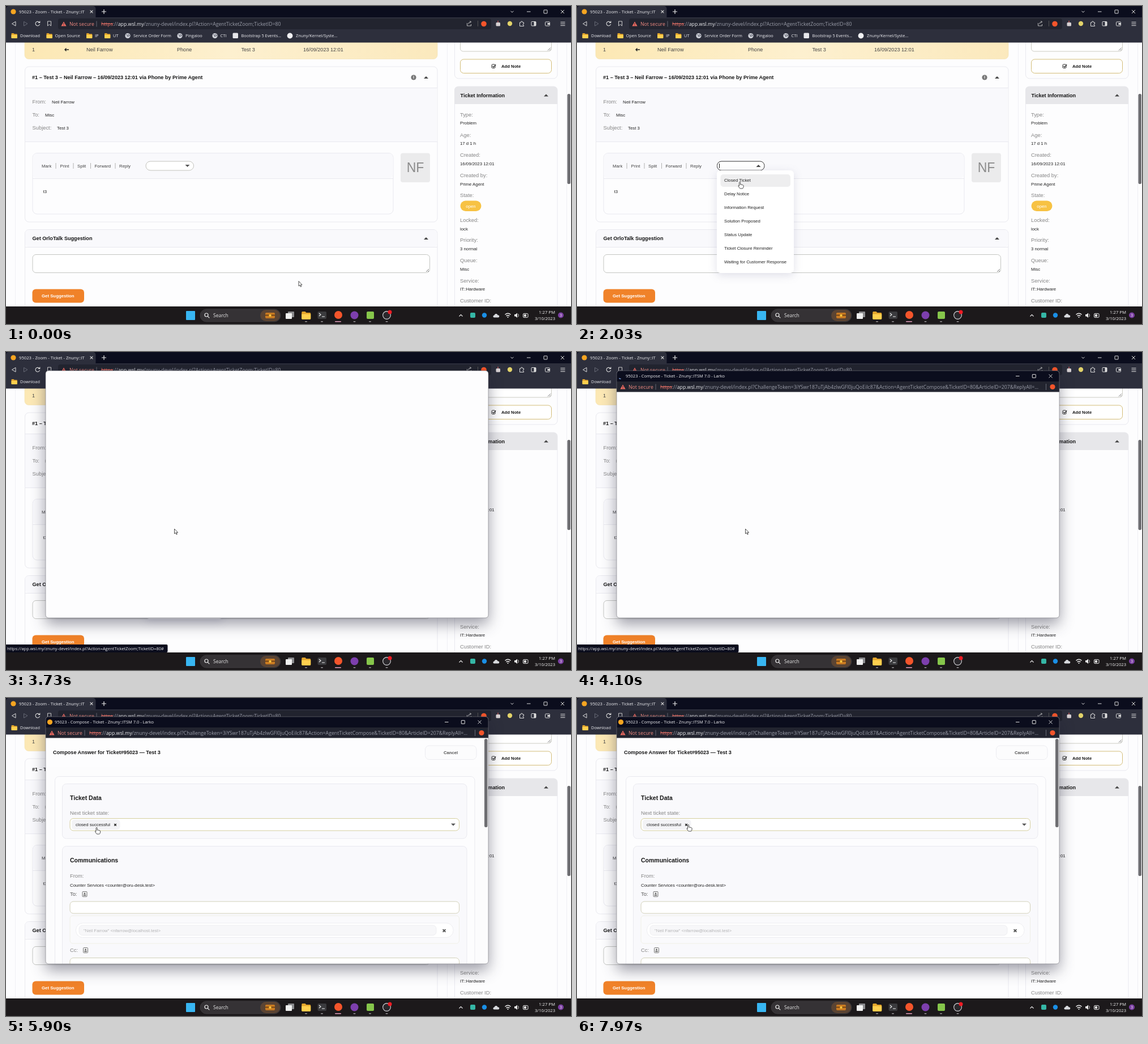
These frames come from a looping animation (998 by 561 pixels, 8 s). An HTML page:

```html
<!DOCTYPE html>
<html lang="en">
<head>
<meta charset="utf-8">
<title>Ticket reply</title>
<style>
html, body { margin: 0; width: 100%; height: 100%; overflow: hidden; background: #fff; }
svg { display: block; width: 100%; height: 100%; font-family: "Liberation Sans", Arial, sans-serif; }
.ui { font-family: "Open Sans", "Noto Sans", sans-serif; }
.pop-shadow { filter: drop-shadow(0 11px 13px rgba(25, 25, 45, .42)); }
.menu-shadow { filter: drop-shadow(0 4px 8px rgba(60, 60, 110, .16)); }
</style>
</head>
<body>
<svg id="stage" viewBox="0 0 998 561" preserveAspectRatio="none"></svg>
<script>
const LOOP = 8000;
const INK = '#222', MUTED = '#858585', EDGE = '#e9e9ef', TINT = '#f9f9fc', ORANGE = '#f08229', BRAND = '#f4552b';
const USER = 'Neil Farrow', AGENT = 'Prime Agent';

const esc = s => s.replace(/&/g, '&amp;').replace(/</g, '&lt;');
// y is the vertical middle of the line
const text = (x, y, s, size = 7.8, fill = INK, extra = '') =>
  `<text x="${x}" y="${y + size * .35}" font-size="${size}" fill="${fill}" ${extra}>${esc(s)}</text>`;
const bold = (x, y, s, size = 9.1, fill = '#151515', extra = '') => text(x, y, s, size, fill, 'font-weight="700" ' + extra);
const label = (x, y, s) => text(x, y, s, 9.35, MUTED);
const box = (x, y, x2, y2, r = 0, fill = '#fff', stroke = 'none', extra = '') =>
  `<rect x="${x}" y="${y}" width="${x2 - x}" height="${y2 - y}" rx="${r}" fill="${fill}" stroke="${stroke}" ${extra}/>`;
const dot = (x, y, r, fill) => `<circle cx="${x}" cy="${y}" r="${r}" fill="${fill}"/>`;
const line = (d, stroke, w = 1, extra = '') => `<path d="${d}" fill="none" stroke="${stroke}" stroke-width="${w}" ${extra}/>`;
const shape = (d, fill) => `<path d="${d}" fill="${fill}"/>`;
const group = (id, body, extra = '') => `<g id="${id}" ${extra}>${body}</g>`;
const up = (x, y, c = '#444') => shape(`M${x - 4} ${y + 2}h8l-4-4z`, c);
const down = (x, y, c = '#555') => shape(`M${x - 4} ${y - 2}h8l-4 4z`, c);
const cross = (x, y, r, c, w = 1) => line(`M${x - r} ${y - r}l${2 * r} ${2 * r}m0 ${-2 * r}l${-2 * r} ${2 * r}`, c, w);
const chevron = (x, y, c = '#222', w = 1.3) => line(`M${x - 2.5} ${y - 1.2}l2.5 2.5 2.5-2.5`, c, w);
const folder = (x, y, k = 1) => `<g transform="translate(${x} ${y}) scale(${k})">` +
  shape('M-5-3.5q0-1 1-1h3l1.3 1.3h4q1 0 1 1v5.5q0 1-1 1h-8.3q-1 0-1-1z', '#e3a52c') + shape('M-5-1.6h10.3v5q0 1-1 1h-8.3q-1 0-1-1z', '#ffd04f') + '</g>';
const globe = (x, y) => dot(x, y, 4.6, '#d5d7de') + line(`M${x - 3} ${y - 2}l3 1-1 3M${x + 1} ${y - 3}l2 2.5-2 2`, '#5b5e6c', 1.2);
const warning = (x, y) => shape(`M${x} ${y - 4}l4.6 8h-9.2z`, '#ee6c62') + line(`M${x} ${y - 1.4}v2.6m0 .8v1`, '#2a2030', 1);
const grip = (x, y) => line(`M${x} ${y}l5-5m-2 5l2-2`, '#555', .8);
const controls = (x, y, gap) => line(`M${x - 3} ${y}h6.5`, '#ddd') +
  box(x + gap - 3, y - 3, x + gap + 3, y + 3, .5, 'none', '#ddd') + cross(x + 2 * gap, y, 3, '#ddd');
const address = (x, y, rest) => warning(x - 66, y) + text(x - 56, y, 'Not secure', 8.7, '#f28b82') +
  line(`M${x - 8} ${y - 5}v10`, '#666975') +
  `<text x="${x}" y="${y + 3}" font-size="8.73" fill="#9b9eaa"><tspan fill="#e57067" text-decoration="line-through">https</tspan>://` +
  `<tspan fill="#f1f1f4">app.wsl.my</tspan>${esc(rest)}</text>`;

function page() {
  const bar = x => line(`M${x} 277v10`, '#aaa', .9);
  let s = box(0, 64, 998, 530, 0, '#fdfdfe') + line('M16.5 64V530M779.5 64V530M990.5 64V530', '#f0f0f4');
  s += box(33, 50, 762, 93.5, 7, 'url(#gold)', '#f4e3b4', 'stroke-width=".7"');
  s += text(46, 77, '1', 9.1, '#444') + line('M111 77h-7m2.5-2.5l-2.5 2.5 2.5 2.5', '#222', 1.4);
  [[142, USER], [302, 'Phone'], [415.5, 'Test 3'], [525, '16/09/2023 12:01']].forEach(([x, v]) => s += text(x, 77, v, 9.1, '#444'));

  s += box(33.5, 107, 762, 381, 7, '#fdfdfe', EDGE) + box(34, 145, 761.5, 239, 0, TINT) +
    line('M34 144.5H762M34 239.5H762', EDGE) + bold(46, 126, `#1 – Test 3 – ${USER} – 16/09/2023 12:01 via Phone by ${AGENT}`) +
    dot(720, 126, 4.6, '#777') + text(720, 126, 'i', 7, '#fff', 'text-anchor="middle" font-weight="700"') + up(742, 126);
  [['From:', 81, USER], ['To:', 69, 'Misc'], ['Subject:', 90, 'Test 3']].forEach(([k, x, v], i) =>
    s += label(46.5, 169 + 22.8 * i, k) + text(x, 169.4 + 22.8 * i, v));
  s += box(47, 259.5, 684, 367, 8, '#fdfdfe', EDGE) + box(47.5, 260, 683.5, 304, 7, TINT) + line('M47 304.5H684', EDGE);
  [[63, 'Mark'], [95.5, 'Print'], [126, 'Split'], [156.5, 'Forward'], [200, 'Reply']].forEach(([x, v]) => s += text(x, 282, v, 7.8, '#444'));
  s += [88, 119, 149.5, 193].map(bar).join('') + text(65.5, 327, 't3');
  s += box(697, 259.5, 749, 311, 4, '#ebebec') + text(723, 285, 'NF', 23, '#8b8b8b', 'text-anchor="middle"');
  s += group('replyShut', box(247, 274, 331.5, 290, 8, '#fff', '#c3c3bd') + down(320.5, 282));

  s += box(33.5, 394.5, 762, 550, 7, '#fdfdfe', EDGE) + box(34, 395, 761.5, 425, 6, TINT) + line('M34 425.5H762', EDGE) +
    bold(46.5, 410, 'Get OrloTalk Suggestion') + up(742, 410) +
    box(47, 438.5, 748.5, 470.5, 6, '#fff', '#c4c6c2') + grip(742, 469) +
    box(46.5, 499.5, 138, 523.5, 6, ORANGE) + bold(63, 511.5, 'Get Suggestion', 7.8, '#fff');

  s += box(792.5, 40, 974, 128, 7, '#fdfdfe', EDGE) + box(802.5, 40, 963.5, 80, 5, '#fff', '#ccccc4') + grip(957, 78.5) +
    box(802.5, 94, 963.5, 118.5, 6, '#fff', '#d3bd78') + bold(875, 106.3, 'Add Note', 7.7) +
    box(858, 103, 864, 109.5, 1.4, 'none', '#222') + line('M859.5 106l1.7 1.8 4-4.5', '#222', 1.2);
  s += box(792.5, 142, 974, 560, 7, '#fdfdfe', EDGE) + shape('M792 173V149q0-7 7-7H967q7 0 7 7V173z', '#e7e7ea') +
    bold(802.5, 157.5, 'Ticket Information') + up(954, 157.5);
  [[191.5, 'Type:', 'Problem'], [227.3, 'Age:', '17 d 1 h'], [263, 'Created:', '16/09/2023 12:01'], [298.7, 'Created by:', AGENT],
   [334, 'State:', ''], [377.7, 'Locked:', 'lock'], [413, 'Priority:', '3 normal'], [449, 'Queue:', 'Misc'],
   [484.3, 'Service:', 'IT::Hardware'], [520, 'Customer ID:', '']].forEach(([y, k, v]) =>
    s += label(802, y, k) + text(802, y + 15.2, v));
  s += box(802.5, 343.5, 839.5, 362, 9.2, '#f7c243') + text(821, 353, 'open', 7.8, '#fff', 'text-anchor="middle"');
  return s + box(991.5, 155, 997, 314, 2.5, '#6e6e72');
}

function replyMenu() {
  const names = ['Closed Ticket', 'Delay Notice', 'Information Request', 'Solution Proposed', 'Status Update',
    'Ticket Closure Reminder', 'Waiting for Customer Response'];
  return box(247.5, 274, 331, 290, 7.5, '#fff', '#333') + line('M251.5 278v8', '#222', 1) + up(320.5, 282) +
    box(247, 290, 383, 471, 6, '#fff', 'none', 'class="menu-shadow"') + box(253.5, 297, 377, 319, 5, '#eeeeef') +
    names.map((n, i) => text(260, 307.7 + 23.9 * i, n)).join('');
}

function chrome() {
  let s = box(0, 0, 998, 21, 0, '#0b0d1d') + box(0, 20, 998, 64.5, 0, '#2d2f3c') + box(0, 0, 158.5, 24, 5, '#2d2f3c') +
    dot(13, 10, 4.6, '#f6a521') + `<g clip-path="url(#tab)">${text(23, 10, '95023 - Zoom - Ticket - Znuny::ITSM', 7.7, '#f0f0f3')}</g>` +
    cross(151, 10, 2.4, '#ddd', 1.1) + line('M169 10h8m-4-4v8', '#eee', 1.2) + chevron(894, 10, '#ddd', 1) + controls(923, 10, 30);
  s += line('M17 27.5l-6.5 3.8 6.5 3.8z', '#ddd') + line('M31.500 27.500l6.500 3.800-6.500 3.800z', '#666975') +
    line('M59 29a3.800 3.800 0 1 0 .6 3M59.800 26.500v3h-3', '#ddd', 1.1) + line('M73.500 27h6v8l-3-2.500-3 2.500z', '#ccc') +
    box(92, 22, 857, 41, 4, '#22242f') + address(168, 31.5, '/znuny-devel/index.pl?Action=AgentTicketZoom;TicketID=80');
  s += line('M814.500 30v5h7v-3M817 32q0-4 4.500-4m-2-1.500l2 1.500-2 1.700', '#ccc', .9) + line('M833.500 26v10', '#555') + dot(844, 31.500, 4.800, BRAND);
  s += box(865.5, 29, 873, 35.5, 1.5, '#d6d0d2') + line('M869 26v3', '#d66', 1.2) + dot(890, 31, 4.2, '#e2d36a') +
    line('M907.500 29h2q0-2 1.500-2t1.500 2h2v2.500q-1.500 0-1.500 1.200t1.500 1.300v1.500h-7z', '#ddd') +
    box(928, 27.5, 936, 35, 1, 'none', '#ddd') + box(932.5, 28, 936, 35, 0, '#ddd') +
    box(952.5, 28, 960.5, 35, 1.3, 'none', '#ddd') + box(956.5, 30, 961, 33, 0, '#ddd') + line('M979.500 28.500h8m-8 3h8m-8 3h8', '#ddd', 1.1);
  s += [14.5, 76.5, 147, 179].map(x => folder(x, 52.5)).join('') + [215, 307, 369].map(x => globe(x, 52.5)).join('') +
    box(400.5, 47.5, 410, 57, 1.5, '#e6e6ea') + dot(501.5, 52.5, 4.9, '#f0f0f3');
  [[25, 'Download'], [86.5, 'Open Source'], [157, 'IP'], [189, 'UT'], [225, 'Service Order Form'], [317, 'Pingaloo'], [378.5, 'CTI'],
   [415.5, 'Bootstrap 5 Events...'], [512, 'Znuny/Kernel/Syste...']].forEach(([x, v]) => s += text(x, 52.5, v, 7.4, '#eeeef2'));
  return s;
}

function taskbar() {
  let s = box(0, 530, 998, 561, 0, '#1c191b') + box(318, 538, 334, 554, 1, '#38b6f2') +
    box(343, 535, 485, 557, 11, '#353235', '#444144', 'stroke-width=".7"') + `<circle cx="354" cy="545" r="3" fill="none" stroke="#eee" stroke-width="1.2"/>` +
    line('M356.300 547.300l3 3', '#eee', 1.200) + text(366, 545.8, 'Search', 8.5, '#e6e6e6') +
    box(449, 536, 484, 556, 10, '#5b4433') + box(458, 541, 475, 551, 2, '#c87a22') + line('M458 545.500h17', '#5b3411', 1.500) + box(464.5, 544, 468.5, 548, 1, '#f8c33b');
  s += box(498, 539, 509, 549, 1, '#8b8b8e') + box(494, 542, 505, 552, 1, '#f0f0f0') + folder(530, 546, 1.55) +
    box(550.5, 539, 566, 552, 2, '#3b3b3e') + line('M553 542l3 2.500-3 2.500m5 1h5', '#f2f2f2', 1.100) +
    dot(587, 545, 7, BRAND) + dot(615.5, 545.5, 7, '#7d3fae') + box(637, 539, 650, 552, 2, '#86c64b') +
    dot(672.5, 545.5, 7.4, '#d8d8dc') + dot(672.5, 545.5, 6.3, '#2a282c') + dot(678, 540, 3.5, '#f01b24');
  s += [530, 558, 615.5, 643, 672.5].map(x => box(x - 2, 556, x + 2, 557.5, .7, '#9a979a')).join('') + box(581, 556, 592, 557.5, .7, '#e5a0c0');
  s += line('M800.500 547.500l3-3 3 3', '#eee', 1.100) + box(820, 541, 829, 550, 2, '#35b7a6') + dot(845, 545.5, 4.2, '#1a8fe6') +
    shape('M862 549.500q-2-.5-1.500-2.500 .5-1.500 2-1.500 1-3 3.500-2.500 2 .3 2.500 2.200 2.800 0 2.800 2.300 0 1.800-1.800 2z', '#d8dade') +
    line('M881.500 544.500q5-4.500 10 0M883.500 547q3-2.500 6 0', '#eee', 1.300) + dot(886.5, 549, 1.1, '#eee') +
    shape('M898 544h2l3-2.500v8.500l-3-2.500h-2z', '#eee') + line('M904.500 543q2 2.500 0 5.500', '#eee', .9) +
    box(913.5, 542.5, 922, 549.5, 1.5, 'none', '#eee') + box(915, 544, 919, 548, 0, '#eee') +
    text(970, 540, '1:27 PM', 7.75, '#f2f2f2', 'text-anchor="end"') + text(970, 551, '3/10/2023', 7.6, '#f2f2f2', 'text-anchor="end"') +
    dot(980, 545.5, 5, '#7b3fa3') + text(980, 545.5, '3', 6.5, '#fff', 'text-anchor="middle"');
  return s;
}

function mailFields(y, toBox) {
  const contact = (x, cy) => box(x - 4, cy - 4.5, x + 4, cy + 4.5, 1, '#f4f4f4', '#777') + dot(x, cy - 1, 1.4, '#666') + box(x - 2.5, cy + 1, x + 2.5, cy + 2.8, 1, '#666');
  const cc = y + (toBox ? 159 : 106.5);
  return box(99.5, y - 24.5, 814, 520, 7, TINT, EDGE) + bold(113, y, 'Communications', 10.5) + label(113, y + 27.3, 'From:') +
    text(113, y + 44, 'Counter Services <counter@oru-desk.test>') + text(113, y + 60, 'To:', 9.35, '#555') + contact(139, y + 60) +
    box(113, y + 73, 800.5, y + 94, 6, '#fff', '#d2d0b9') + toBox + label(113, cc, 'Cc:') + contact(140.5, cc) +
    box(113, cc + 13.5, 800.5, cc + 34, 6, '#fff', '#d2d0b9');
}

function rawForm() {
  const pick = (x, y, x2, v) => box(x, y - 9.5, x2, y + 9.5, 8, '#fff', '#ececf0') + text(x + 9, y, v) + chevron(x2 - 6.5, y);
  let s = box(99.5, 151.5, 814, 302, 7, TINT, EDGE) + pick(113, 222, 202, 'closed successful') + label(113, 243.7, 'Pending date:');
  [[113, 150, '06', '/'], [158, 196, '10', '/'], [204, 250, '2023', '-'], [259, 296, '13', ':'], [304.5, 341, '27', '']].forEach(([x, x2, v, sep]) =>
    s += pick(x, 265.5, x2, v) + text(x2 + 3, 265.5, sep));
  return s + text(113, 283.8, 'For all pending* states.', 7.8, '#b5b5b8') + mailFields(340, '') + box(845, 72, 850.5, 237, 2.5, '#6e6e72');
}

function readyForm() {
  const to = box(113, 384, 800.5, 433, 5, '#fafafc', '#efefe6') + box(123.5, 397, 790, 422.5, 12, '#fff', '#ededf0') +
    box(129, 401, 760, 418.5, 6, '#f7f7f9', '#eeeef1') + text(137, 410, `"${USER}" <nfarrow@localhost.test>`, 7.8, '#b4b4b6') + cross(774, 410.5, 2.4, '#555', 1.9);
  return box(99.5, 151.5, 814, 248, 7, TINT, EDGE) + mailFields(286, to) + box(845, 72, 850.5, 228, 2.5, '#6e6e72') +
    group('tag', box(113, 212.5, 800.5, 234, 6, '#fff', '#d5cf9f') + box(116, 214.5, 201.5, 232, 5, '#f3f3f6') +
      text(123, 223.4, 'closed successful') + cross(193, 223.7, 1.8, '#222', 1.4) + down(790, 223.5)) +
    group('stateMenu', box(113, 212.5, 800.5, 234, 6, '#fff', '#4a4538') + up(790, 223.2) +
      box(113, 235, 200, 271.5, 6, '#fff', 'none', 'class="menu-shadow"') + box(119.5, 241.5, 193.5, 263.5, 5, ORANGE) +
      text(156.5, 252.3, 'closed successful', 7.8, '#fff', 'text-anchor="middle"'));
}

function popup() {
  const bar = box(70, 33, 852, 53, 0, '#0b0d1d') + box(70, 52, 852, 70.5, 0, '#22242f') +
    text(86, 42.5, '95023 - Compose - Ticket - Znuny::ITSM 7.0 - Larko', 7.5, '#f0f0f3') + controls(778, 42.5, 29.3) +
    address(147, 61.5, '/znuny-devel/index.pl?ChallengeToken=3iYSwr187uTjAb4zIwGFl0juQoEiIc87&Action=AgentTicketCompose&TicketID=80&ArticleID=207&ReplyAll=...') +
    line('M828.500 56v11', '#666975') + dot(840, 61.5, 4.6, BRAND) +
    group('spinner', line('M74.500 46q1 2 3 1', '#8ab4f8', 1.2)) + group('favicon', dot(77.5, 42.5, 4.6, '#f6a521'));
  const body = box(70, 122, 852, 470, 0, '#fcfcfd') + bold(83, 95.7, 'Compose Answer for Ticket#95023 — Test 3') +
    box(740.5, 84, 831, 108.5, 7, '#fcfcfd', '#ececf0') + bold(785.5, 96.2, 'Cancel', 7.7, '#555', 'text-anchor="middle"') +
    box(86.5, 138.5, 828, 520, 7, '#fdfdfe', EDGE) + group('raw', rawForm()) + group('ready', readyForm()) +
    bold(113, 176, 'Ticket Data', 10.5) + label(113, 203, 'Next ticket state:');
  return box(70, 33, 852, 469, 5, '#fdfdfe', 'none', 'class="pop-shadow"') +
    `<g clip-path="url(#win)">${group('popBody', body)}${group('popBar', bar, 'class="ui"')}</g>` + box(70, 33, 852, 469, 5, 'none', '#77787d', 'stroke-width=".6"');
}

const arrow = '<path d="M0 0v8.600l2-1.700 1.400 3 1.400-.6-1.400-2.900h2.700z" fill="#fff" stroke="#222" stroke-width=".8"/>';
const hand = '<path d="M-.9 1q0-1 1-1t1 1v3.500q2.500-.3 5 1.200.8.500.6 1.600l-.6 2.700q-.3 1.500-1.500 1.500h-3.600q-.9 0-1.500-1l-2-3.300q-.3-1 .6-1.200l1 .8z" fill="#fff" stroke="#222" stroke-width=".8"/>';

const stage = document.getElementById('stage');
stage.innerHTML = `<defs>
<linearGradient id="gold"><stop stop-color="#fce8b4"/><stop offset=".5" stop-color="#fdf0cf"/><stop offset="1" stop-color="#fbe9bd"/></linearGradient>
<clipPath id="tab"><rect width="139" height="20"/></clipPath>
<clipPath id="win"><rect x="70" y="33" width="782" height="436" rx="5"/></clipPath></defs>` +
  page() + group('replyMenu', replyMenu()) + group('chrome', chrome(), 'class="ui"') +
  group('status', box(-3, 516, 285.5, 530, 2, '#0b0d1d') +
    text(2, 523, 'https://app.wsl.my/znuny-devel/index.pl?Action=AgentTicketZoom;TicketID=80#', 7.48, '#f0f0f3'), 'class="ui"') +
  group('popup', popup()) + group('taskbar', taskbar(), 'class="ui"') +
  group('cursor', group('arrow', arrow) + group('hand', hand));

const el = {};
stage.querySelectorAll('g[id]').forEach(g => el[g.id] = g);
const show = (id, on) => el[id].style.display = on ? '' : 'none';
const within = (t, a, b) => t >= a && t < b;

// time, x, y of the pointer
const PATH = [[0, 517, 485.5], [300, 517, 485.5], [1150, 300, 282], [1550, 292, 282], [1950, 287.5, 310.5], [3350, 287.5, 310.5],
  [3700, 297.5, 312], [4150, 297.5, 312], [4530, 253, 287.5], [5400, 160, 228.5], [6050, 160, 228.5], [6500, 192, 223],
  [6800, 192, 223], [7150, 267, 257], [7250, 267, 257], [7500, 165, 250], [7670, 165, 250], [7950, 196.5, 223.5], [LOOP, 196.5, 223.5]];

function pointer(t) {
  const i = PATH.findIndex(k => k[0] > t), [t0, x0, y0] = PATH[i - 1], [t1, x1, y1] = PATH[i];
  const u = (t - t0) / (t1 - t0), e = u * u * (3 - 2 * u);
  return [x0 + (x1 - x0) * e, y0 + (y1 - y0) * e];
}

function draw(t) {
  const replyOpen = within(t, 1450, 4000), stateOpen = within(t, 6750, 7650), loaded = t >= 5050;
  const overLink = within(t, 1080, 3560) || within(t, 5150, 6900) || t >= 7400;
  show('replyMenu', replyOpen);
  show('replyShut', !replyOpen);
  show('status', within(t, 3420, 4260));
  show('popup', t >= 3520);
  el.popup.style.opacity = Math.min(1, Math.max(0, (t - 3520) / 120));
  show('popBar', t >= 4050);
  show('popBody', t >= 4300);
  show('raw', !loaded);
  show('ready', loaded);
  show('spinner', !loaded);
  show('favicon', loaded);
  show('tag', !stateOpen);
  show('stateMenu', stateOpen);
  show('hand', overLink);
  show('arrow', !overLink);
  el.cursor.setAttribute('transform', `translate(${pointer(t)})`);
}

const start = performance.now();
function tick() {
  draw((performance.now() - start) % LOOP);
  requestAnimationFrame(tick);
}
tick();
</script>
</body>
</html>
```
